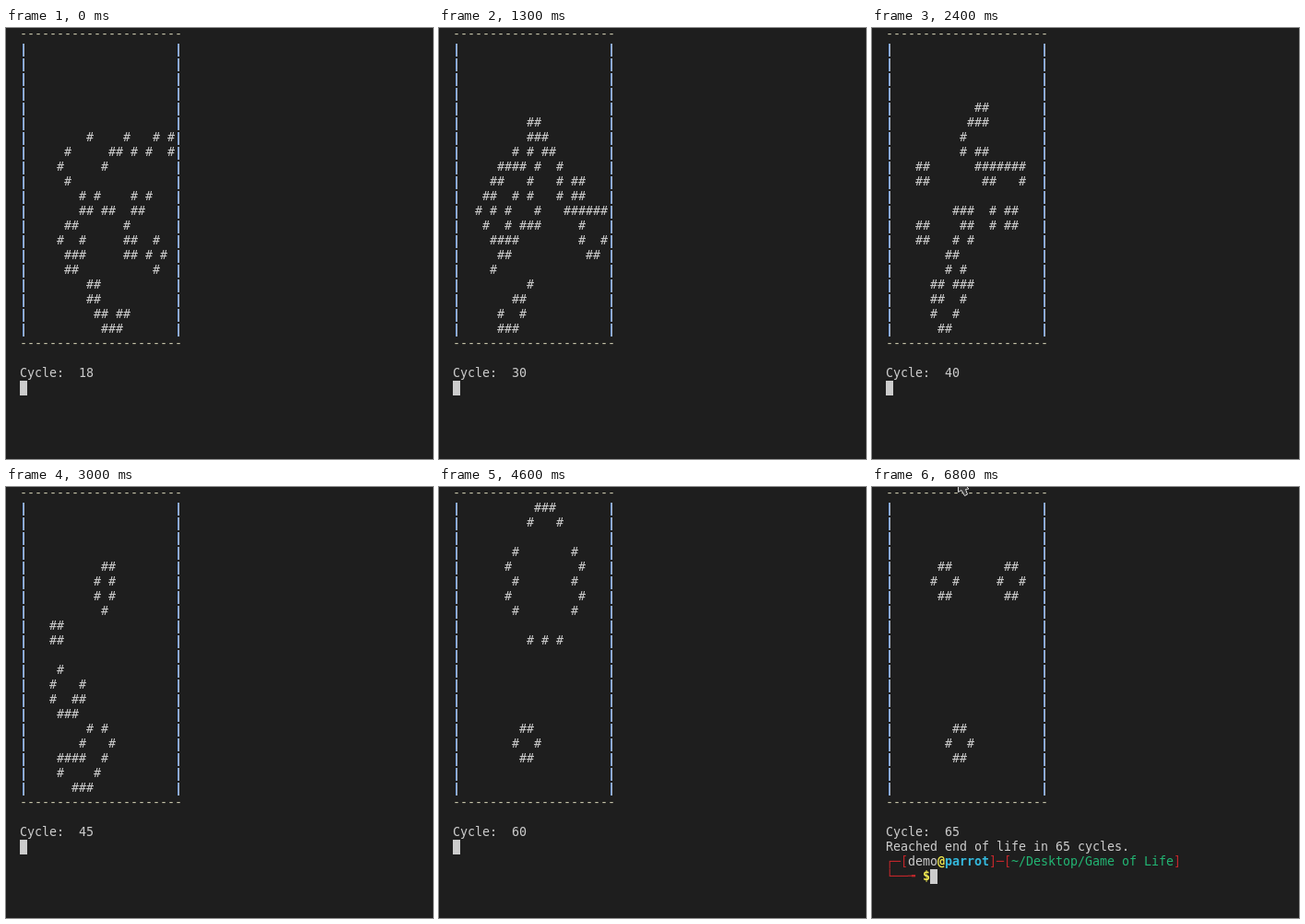
An HTML page with a canvas for the animation above (6900 ms loop, 463 by 468 pixels).

```html
<!DOCTYPE html>
<html lang="en">
<head>
<meta charset="utf-8">
<title>Life in a terminal</title>
<style>
  html, body { margin: 0; width: 100%; height: 100%; overflow: hidden; background: #1e1e1e; }
  canvas { display: block; }
</style>
</head>
<body>
<canvas id="stage" width="463" height="468"></canvas>
<script>
const ctx = document.getElementById('stage').getContext('2d', { alpha: false });
const LOOP = 6900, STEP = 100;
const SIZE = 20, FIRST = 18, LAST = 65;
const LEFT = 15, CELL_W = 8, CELL_H = 16;
const BG = '#1e1e1e', FG = '#cccccc', DASH = '#c8c6aa', RED = '#c3272b',
      YELLOW = '#f0ea50', CYAN = '#34b8dc', GREEN = '#22b573';
const FONT = '13.333px "DejaVu Sans Mono", monospace';

// Live columns (base 20) of rows 7 to 20 at the first cycle
const SEED = '8dhj 5bcegj 4a 5 79eg 78abef 56d 47deh 567degi 56h 89 89 9acd abc';

function seedGrid() {
  const grid = Array.from({ length: SIZE }, () => Array(SIZE).fill(0));
  SEED.split(' ').forEach((cols, i) => {
    for (const c of cols) grid[i + 6][parseInt(c, 20)] = 1;
  });
  return grid;
}

// Cells beyond the border count as dead
function evolve(grid) {
  return grid.map((row, y) => row.map((alive, x) => {
    let sum = 0;
    for (let dy = -1; dy <= 1; dy++)
      for (let dx = -1; dx <= 1; dx++) sum += grid[y + dy]?.[x + dx] || 0;
    return sum === 3 || (alive && sum === 4) ? 1 : 0;
  }));
}

const cycles = [seedGrid()];
while (cycles.length <= LAST - FIRST) cycles.push(evolve(cycles[cycles.length - 1]));

// The display stalls for one tick now and then, and skips one cycle
const STALLS = [4, 18, 25, 36], SKIPPED = 28;

function cycleAt(tick) {
  if (tick === SKIPPED) tick--;
  const lost = STALLS.filter(s => s <= tick).length;
  return Math.min(LAST, FIRST + tick - lost);
}

function write(text, col, row, color = FG, bold = false) {
  ctx.font = (bold ? 'bold ' : '') + FONT;
  ctx.fillStyle = color;
  [...text].forEach((ch, i) => {
    if (ch !== ' ') ctx.fillText(ch, LEFT + (col + i) * CELL_W, row * CELL_H + 11);
  });
}

function bar(col, row) {
  const x = LEFT + col * CELL_W + 3, y = row * CELL_H + 1;
  ctx.fillStyle = '#729fe0';
  ctx.fillRect(x, y, 1, 14);
  ctx.fillStyle = '#a8b4c8';
  ctx.fillRect(x + 1, y, 1, 14);
}

function caret(col, row) {
  ctx.fillStyle = FG;
  ctx.fillRect(LEFT + col * CELL_W, row * CELL_H - 1, CELL_W, CELL_H);
}

function board(grid) {
  const edge = '-'.repeat(SIZE + 2);
  write(edge, 0, 0, DASH);
  write(edge, 0, SIZE + 1, DASH);
  grid.forEach((row, y) => {
    bar(0, y + 1);
    bar(SIZE + 1, y + 1);
    write(row.map(c => c ? '#' : ' ').join(''), 1, y + 1);
  });
}

function prompt() {
  write(`Reached end of life in ${LAST} cycles.`, 0, 24);
  const parts = [
    ['┌─[', RED], ['demo', FG], ['@', YELLOW, true], ['parrot', CYAN, true],
    [']─[', RED], ['~/Desktop/Game of Life', GREEN], [']', RED]
  ];
  let col = 0;
  for (const [text, color, bold] of parts) {
    write(text, col, 25, color, bold);
    col += text.length;
  }
  write('└──╼', 0, 26, RED);
  write('$', 5, 26, YELLOW, true);
  caret(6, 26);
}

function pointer(x, y) {
  const outline = [[0, 0], [0, 15], [3.5, 13], [7, 19], [10, 17.5], [8, 12], [11.5, 11.5]];
  ctx.beginPath();
  outline.forEach(([dx, dy]) => ctx.lineTo(x + dx, y + dy));
  ctx.closePath();
  ctx.fillStyle = '#3a3a3a';
  ctx.strokeStyle = '#dddddd';
  ctx.fill();
  ctx.stroke();
}

function draw(now) {
  const tick = Math.floor(now % LOOP / STEP);
  const cycle = cycleAt(tick);
  ctx.fillStyle = BG;
  ctx.fillRect(0, 0, 463, 468);
  board(cycles[cycle - FIRST]);
  write(`Cycle:  ${cycle}`, 0, 23);
  if (tick >= 52) prompt(); else caret(0, 24);
  if (tick >= 64) {
    const k = (tick - 64) / 4;
    pointer(388 - 294.5 * k, 119.5 - 129 * k);
  }
}

const start = performance.now();
function loop() {
  draw(performance.now() - start);
  requestAnimationFrame(loop);
}
loop();
</script>
</body>
</html>
```
